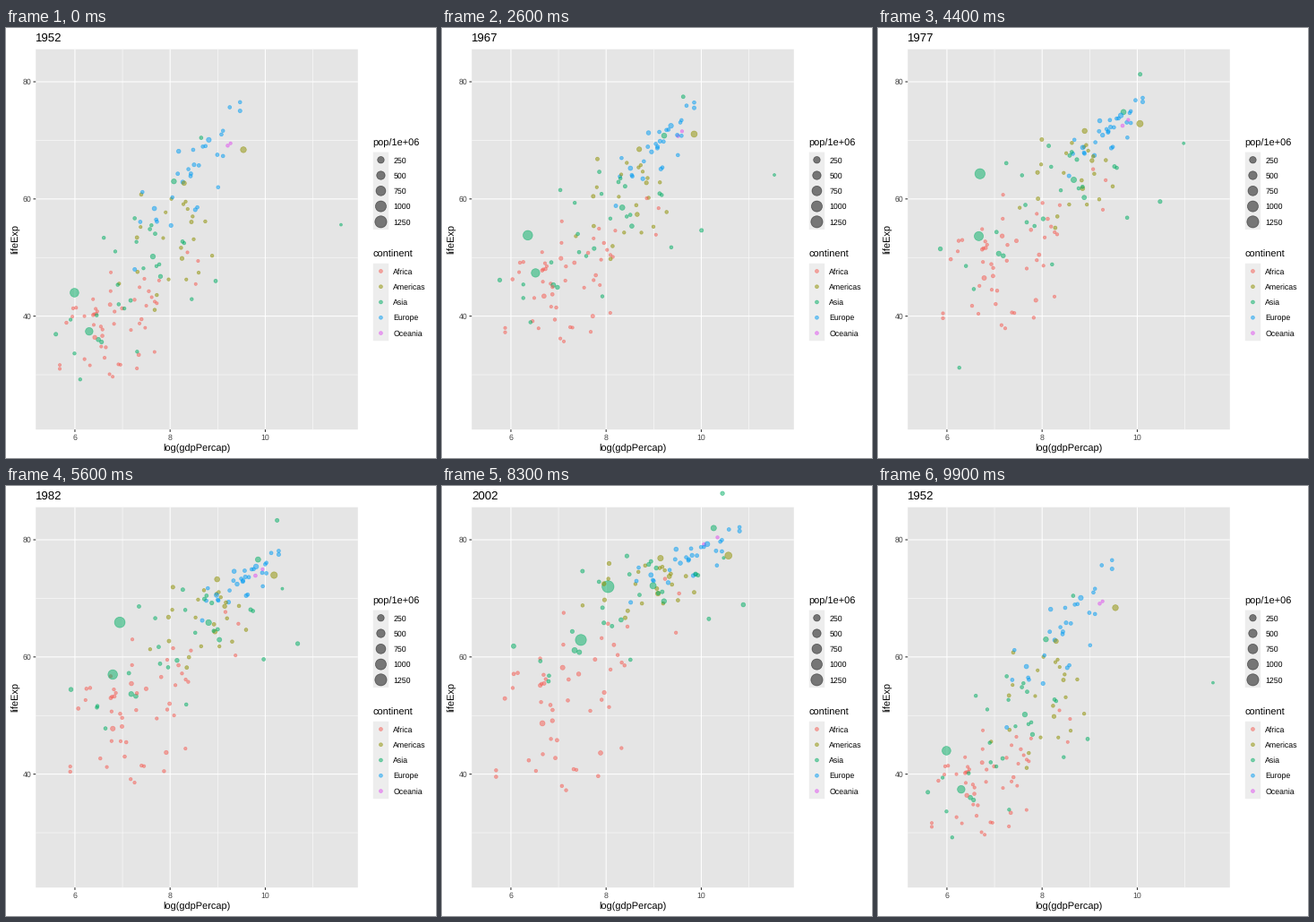
Recreate the animation shown at these times as a matplotlib script. Size 480x480 px, loop 10000 ms.

```python
import numpy as np
import matplotlib.pyplot as plt
from matplotlib.animation import FuncAnimation
from matplotlib.colors import to_rgba
from matplotlib.patches import Rectangle

plt.rcParams["font.family"] = "Liberation Sans"
plt.rcParams["text.hinting"] = "none"
rng = np.random.default_rng(12)

SIZE, DPI = 480, 72
LEFT, TOP, RIGHT, BOTTOM = 33.2, 23.7, 392.8, 448.2
YEARS = np.arange(1952, 2008, 5)
T = (YEARS - 1952) / 50

COLORS = {"Africa": "#F65C53", "Americas": "#8E9000", "Asia": "#00AE64",
          "Europe": "#009CF3", "Oceania": "#E051F0"}

# Each continent is a correlated random cloud. Means and spreads of log income
# (x, sx) and life expectancy (y, sy) are given for 1952, 1977 and 2002;
# pop holds the largest population, its falloff by rank and its growth.
CLOUDS = {
    "Africa": dict(n=51, corr=0.4, skew=0.12, pop=(33, 0.75, 3.2),
                   x=(6.9, 7.35, 7.3), sx=(0.68, 0.8, 0.9),
                   y=(39.1, 50, 53.3), sy=(5, 6.4, 8.5)),
    "Americas": dict(n=24, corr=0.6, skew=0, pop=(57, 0.9, 2.4),
                     x=(8.05, 8.65, 8.85), sx=(0.5, 0.5, 0.6),
                     y=(53, 64.2, 72.3), sy=(8.5, 6.5, 4)),
    "Asia": dict(n=28, corr=0.65, skew=0, pop=(82, 0.8, 2.5),
                 x=(7.3, 8.2, 8.5), sx=(0.8, 1.1, 1.15),
                 y=(46.5, 60, 69.3), sy=(9, 8, 7)),
    "Europe": dict(n=30, corr=0.8, skew=-0.12, pop=(75, 0.6, 1.2),
                   x=(8.45, 9.4, 9.75), sx=(0.6, 0.42, 0.62),
                   y=(64.4, 71.6, 76.7), sy=(6, 2.8, 2.7)),
    "Oceania": dict(n=2, corr=1, skew=0, pop=(9, 1.4, 2),
                    x=(9.24, 9.75, 10.2), sx=(0.03, 0.06, 0.14),
                    y=(69.3, 73, 79.8), sy=(0.2, 0.5, 0.6)),
}

# Countries that leave the crowd: population, growth, (year, income, life) keys
LONERS = [
    ("Asia", 556, 2.3, [(1952, 5.99, 44), (1957, 6.36, 50.5),
                        (1962, 6.19, 44.5), (1972, 6.52, 63.1),
                        (1982, 6.87, 65.5), (2002, 8.04, 72),
                        (2007, 8.51, 73)]),
    ("Asia", 372, 2.78, [(1952, 6.3, 37.4), (1972, 6.59, 50.7),
                         (1982, 6.75, 56.6), (2002, 7.47, 62.9),
                         (2007, 7.81, 64.7)]),
    ("Asia", 86, 1.48, [(1952, 8.08, 63), (1972, 9.6, 73.4),
                        (2002, 10.26, 82)]),
    ("Asia", 0.2, 10, [(1952, 11.59, 55.6), (1962, 11.47, 60.5),
                       (1972, 11.6, 67.7), (1982, 10.35, 71.3),
                       (2002, 10.47, 76.9)]),
    ("Asia", 4.7, 2.7, [(1952, 5.91, 39.4), (1967, 6.26, 45.4),
                        (1977, 6.26, 31.2), (1982, 6.44, 51),
                        (2002, 6.8, 56.8)]),
    ("Africa", 2.5, 3, [(1952, 6.2, 40), (1982, 6.78, 46.2),
                        (1987, 6.74, 44), (1992, 6.6, 23.6),
                        (2002, 6.67, 43.4)]),
    ("Americas", 158, 1.83, [(1952, 9.54, 68.4), (2002, 10.57, 77.3)]),
]


def px(x):
    return LEFT + (x - 5.177) * (RIGHT - LEFT) / 6.768


def py(y):
    return BOTTOM - (y - 20.649) * (BOTTOM - TOP) / 64.904


def radius(pop):
    size = 1 + 5 * np.sqrt(pop / 1319)
    return 0.375 * (2.845 * size + 0.94)


def curve(keys):
    """Parabola through the values for 1952, 1977 and 2002."""
    a, b, c = keys
    return a + (4 * b - 3 * a - c) * T + 2 * (a + c - 2 * b) * T**2


def scores(n, skew=0):
    z = np.clip(rng.normal(size=n), -1.9, 1.9)
    z += skew * z**2
    return ((z - z.mean()) / z.std())[:, None]


def crowd(n, corr, skew, pop, x, sx, y, sy):
    rich = scores(n, skew)
    fit = corr * rich + np.sqrt(1 - corr**2) * scores(n)
    top, falloff, growth = pop
    rank = rng.permutation(n)[:, None] + 1.0
    return (curve(x) + curve(sx) * rich, curve(y) + curve(sy) * fit,
            top * rank**-falloff * growth**T)


def loner(pop, growth, keys):
    year, x, y = zip(*keys)
    return (np.interp(YEARS, year, x)[None], np.interp(YEARS, year, y)[None],
            (pop * growth**T)[None])


def build():
    parts = [(name, crowd(**spec)) for name, spec in CLOUDS.items()]
    parts += [(name, loner(*spec)) for name, *spec in LONERS]
    x, y, pop = (np.vstack(p) for p in zip(*(data for _, data in parts)))
    colors = np.array([to_rgba(COLORS[name], 0.5)
                       for name, data in parts for _ in data[0]])
    order = rng.permutation(len(x))
    return px(x)[order], py(y)[order], radius(pop)[order], colors[order]


def dots(x, y, r, colors):
    return ax.scatter(x, y, s=(2 * np.asarray(r))**2, facecolors=colors,
                      edgecolors=colors, linewidths=0.7, zorder=3)


def text(x, y, label, size=8.8, color="black", ha="left", **kw):
    return ax.text(x, y, label, fontsize=size, color=color, ha=ha,
                   va=kw.pop("va", "baseline"), **kw)


def box(x, y, w, h, color):
    ax.add_patch(Rectangle((x, y), w, h, fc=color, ec="none", snap=False))


def line(x, y, color, width):
    ax.plot(x, y, color=color, lw=width, solid_capstyle="butt", zorder=2,
            snap=False)


def draw_panel():
    box(LEFT, TOP, RIGHT - LEFT, BOTTOM - TOP, "#E5E5E5")
    for v in (7, 9, 11):
        line([px(v)] * 2, [TOP, BOTTOM], "white", 0.53)
    for v in (30, 50, 70):
        line([LEFT, RIGHT], [py(v)] * 2, "white", 0.53)
    for v in (6, 8, 10):
        line([px(v)] * 2, [TOP, BOTTOM], "white", 1.07)
        line([px(v)] * 2, [BOTTOM, BOTTOM + 2.74], "#333333", 1.07)
        text(px(v), 460, str(v), color="#444444", ha="center")
    for v in (40, 60, 80):
        line([LEFT, RIGHT], [py(v)] * 2, "white", 1.07)
        line([LEFT - 2.74, LEFT], [py(v)] * 2, "#333333", 1.07)
        text(28.3, py(v) + 3.2, str(v), color="#444444", ha="right")
    text((LEFT + RIGHT) / 2, 473, "log(gdpPercap)", 11, ha="center")
    text(10.8, (TOP + BOTTOM) / 2, "lifeExp", 11, ha="center", va="center",
         rotation=90)


def draw_legend(title, top, labels, radii, colors):
    key = 17.28
    text(409.5, top - 6.5, title, 11)
    box(409.8, top, key, key * len(labels), "#EDEDED")
    mid = top + key * (np.arange(len(labels)) + 0.5)
    dots(np.full(len(labels), 409.8 + key / 2), mid, radii, colors)
    for y, label in zip(mid, labels):
        text(432.3, y + 3.2, label)


fig = plt.figure(figsize=(SIZE / DPI, SIZE / DPI), dpi=DPI, facecolor="white")
ax = fig.add_axes([0, 0, 1, 1])
ax.set(xlim=(0, SIZE), ylim=(SIZE, 0))
ax.axis("off")
ax.set_autoscale_on(False)

draw_panel()
levels = np.arange(250, 1251, 250)
draw_legend("pop/1e+06", 138.6, [str(v) for v in levels], radius(levels),
            [(0, 0, 0, 0.5)] * 5)
draw_legend("continent", 262.8, list(COLORS), [1.95] * 5,
            [to_rgba(c, 0.5) for c in COLORS.values()])

X, Y, R, RGBA = build()
cloud = dots(X[:, 0], Y[:, 0], R[:, 0], RGBA)
title = text(LEFT, 15, "1952", 13.2)

# Last frame of each move to the next year
ARRIVALS = (8, 17, 26, 35, 44, 51, 59, 67, 75, 83, 91, 99)


def update(frame):
    state = next(i for i, end in enumerate(ARRIVALS) if frame <= end)
    steps = 3 if state == 5 else 4
    part = max(0, 1 - (ARRIVALS[state] - frame) / steps)
    after = (state + 1) % len(YEARS)
    x, y, r = (a[:, state] * (1 - part) + a[:, after] * part for a in (X, Y, R))
    cloud.set_offsets(np.column_stack([x, y]))
    cloud.set_sizes((2 * r)**2)
    title.set_text(str(YEARS[state if part < 0.5 else after]))
    return cloud, title


anim = FuncAnimation(fig, update, frames=100, interval=100, repeat=True,
                     repeat_delay=0, blit=False)
plt.show()
```
